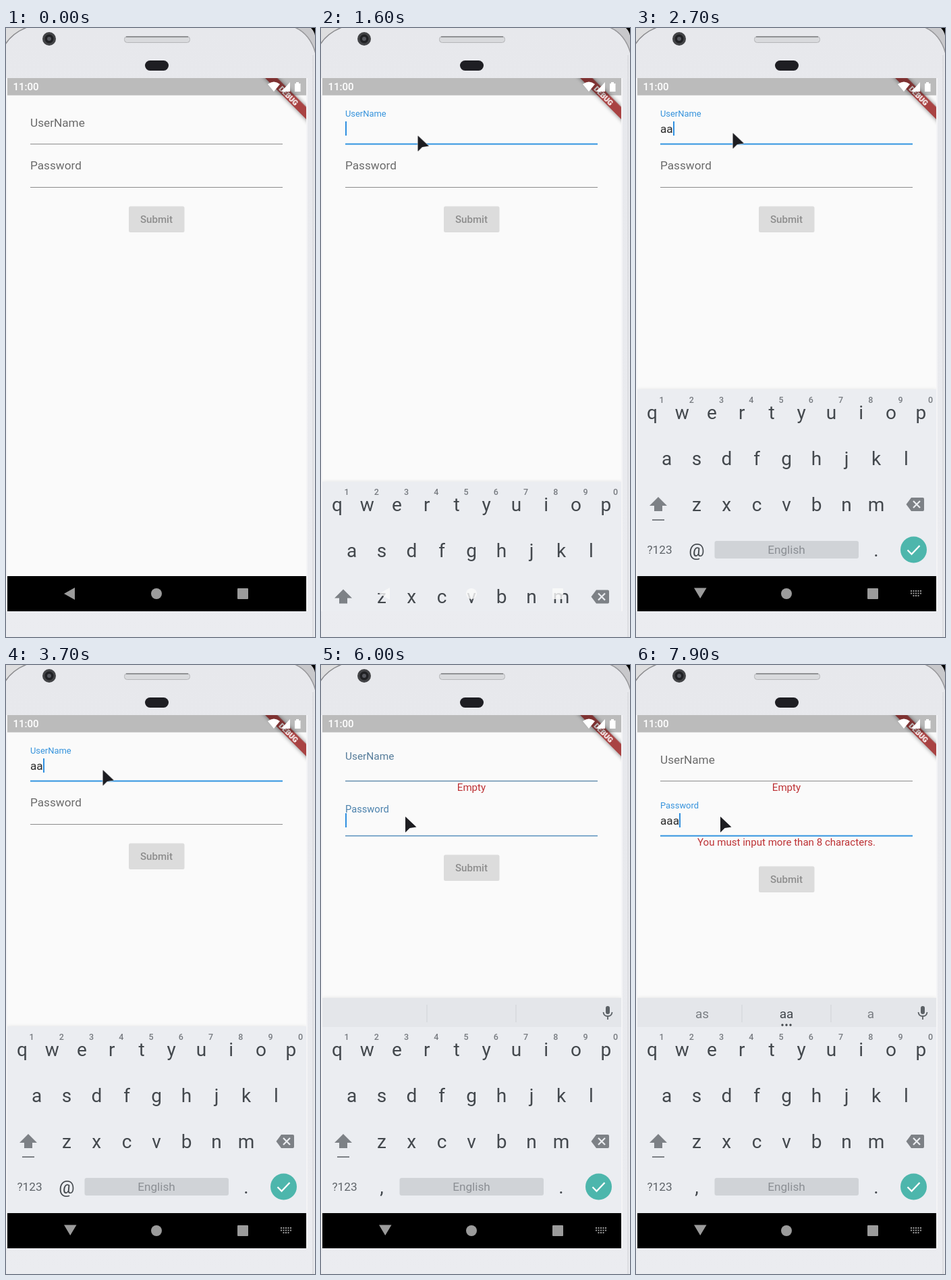
Animation of 458 by 900 pixels, one loop 8 s. Source, as an HTML page:

```html
<!DOCTYPE html>
<html lang="en">
<head>
<meta charset="utf-8">
<title>Login form validation</title>
<style>
  html, body { margin: 0; width: 100%; height: 100%; overflow: hidden; background: #e9ebef; }
  #stage { position: absolute; left: 0; top: 0; width: 458px; height: 900px; overflow: hidden; font-family: Roboto, sans-serif; }
  svg { position: absolute; left: 0; top: 0; }
  .mid { text-anchor: middle; }

  /* Every animation shares one 8 s loop: 1.25% is 100 ms. */
  .smooth { animation: 8s cubic-bezier(.4, 0, .2, 1) infinite both; }
  .step { animation: 8s step-end infinite both; }
  .label { font-size: 17.2px; }

  #userLabel { animation-name: userLabel; }
  @keyframes userLabel {
    0%, 17.625% { transform: translate(36px, 145.5px); fill: #6b6b6b; }
    20.125%, 74.05% { transform: translate(36px, 131.4px) scale(.75); fill: #3693dc; }
    76.55%, 100% { transform: translate(36px, 145.5px); fill: #6b6b6b; }
  }
  #userLine { animation-name: userLine; }
  @keyframes userLine {
    0%, 17.625% { stroke: #8c8c8c; stroke-width: 1px; }
    20.125%, 74.05% { stroke: #3193e0; stroke-width: 2.2px; }
    76.55%, 100% { stroke: #8c8c8c; stroke-width: 1px; }
  }
  #passLabel { animation-name: passLabel; }
  @keyframes passLabel {
    0%, 74.05% { transform: translate(36px, 209px); fill: #6b6b6b; }
    76.55%, 100% { transform: translate(36px, 195.3px) scale(.75); fill: #3693dc; }
  }
  #passLine { animation-name: passLine; }
  @keyframes passLine {
    0%, 74.05% { stroke: #8c8c8c; stroke-width: 1px; }
    76.55%, 100% { stroke: #3193e0; stroke-width: 2.2px; }
  }

  #passField { animation-name: passShift; }
  @keyframes passShift {
    0% { transform: none; }
    49.9%, 100% { transform: translateY(17px); }
  }
  #submit { animation-name: submitShift; }
  @keyframes submitShift {
    0% { transform: none; }
    49.9% { transform: translateY(17px); }
    84.9%, 100% { transform: translateY(34px); }
  }

  .error { font-size: 15.08px; fill: #bd3134; }
  #userError { animation-name: fromEmpty; }
  @keyframes fromEmpty { 0% { opacity: 0; } 49.9%, 100% { opacity: 1; } }
  #passError { animation-name: fromShort; }
  @keyframes fromShort { 0% { opacity: 0; } 84.9%, 100% { opacity: 1; } }

  .typed {
    --a: 9.36px;
    position: absolute; left: 36px; height: 21px; line-height: 22px; overflow: hidden;
    font-size: 17.2px; color: #2b2b2b; white-space: nowrap; border-right: 2px solid #2f8fe0;
  }
  #userText { top: 138px; animation-name: userType, userCaret; }
  @keyframes userType {
    0% { width: 0; }
    29.9% { width: var(--a); }
    32.4% { width: calc(2 * var(--a)); }
    34.9% { width: calc(3 * var(--a)); }
    37.4% { width: calc(4 * var(--a)); }
    41.15% { width: calc(3 * var(--a)); }
    46.15% { width: calc(2 * var(--a)); }
    47.4% { width: var(--a); }
    49.9%, 100% { width: 0; }
  }
  @keyframes userCaret {
    0%, 23.9%, 52.4%, 64.9%, 74.05%, 100% { border-color: transparent; }
    17.625%, 29.9%, 58.65%, 71.15% { border-color: #2f8fe0; }
  }
  #passText { top: 219px; animation-name: passType, passCaret; }
  @keyframes passType {
    0% { width: 0; }
    84.9% { width: var(--a); }
    88.65% { width: calc(2 * var(--a)); }
    93.1%, 100% { width: calc(3 * var(--a)); }
  }
  @keyframes passCaret {
    0%, 80.3% { border-color: transparent; }
    74.05%, 84.9%, 100% { border-color: #2f8fe0; }
  }

  #keyboard { animation: slide 8s cubic-bezier(.333, .667, .667, 1) infinite both; }
  @keyframes slide {
    0%, 18.75% { transform: translateY(334px); }
    22.25%, 100% { transform: none; }
  }
  .forPass { animation-name: forPass; }
  @keyframes forPass { 0% { opacity: 0; } 74.3%, 100% { opacity: 1; } }
  .forUser { animation-name: forUser; }
  @keyframes forUser { 0% { opacity: 1; } 74.3%, 100% { opacity: 0; } }
  #hints { animation-name: hints; }
  @keyframes hints { 0% { opacity: 0; } 86.15%, 100% { opacity: 1; } }

  #navBack { animation-name: navBack; }
  @keyframes navBack { 0%, 21.15%, 100% { opacity: 1; } 18.9% { opacity: 0; } }
  #navIcons { animation-name: navIcons; }
  @keyframes navIcons { 0%, 21.15%, 100% { fill: #9b9b9b; } 18.9% { fill: #fafafacc; } }
  #back { animation-name: backOut; }
  @keyframes backOut { 0% { opacity: 1; } 21.15%, 100% { opacity: 0; } }
  .hide { animation-name: hideIn; }
  @keyframes hideIn { 0% { opacity: 0; } 21.15%, 100% { opacity: 1; } }

  #pointer { animation: move 8s linear infinite both; }
  @keyframes move {
    0%, 2.5% { transform: translate(475px, 425px); }
    6.25% { transform: translate(370px, 335px); }
    8.75% { transform: translate(258px, 252px); }
    11.25% { transform: translate(174px, 184px); }
    12.5%, 20% { transform: translate(143.5px, 159px); }
    22.5%, 56.25% { transform: translate(143.5px, 155px); }
    57.5% { transform: translate(186px, 195px); }
    58.75% { transform: translate(221px, 238px); }
    60% { transform: translate(196px, 243px); }
    62.5%, 63.75% { transform: translate(136px, 242px); }
    65% { transform: translate(129.5px, 217px); }
    67.5%, 68.75% { transform: translate(128px, 221px); }
    72.5%, 100% { transform: translate(125px, 224px); }
  }
</style>
</head>
<body>
<div id="stage">
  <svg width="458" height="900" viewBox="0 0 458 900">
    <defs>
      <clipPath id="screen"><path d="M2 74H445V862H2Z"/></clipPath>
      <linearGradient id="body" x2="0" y2="1">
        <stop offset="0" stop-color="#e7e8ec"/>
        <stop offset="1" stop-color="#ebecf0"/>
      </linearGradient>
      <filter id="blur" x="-30%" y="-100%" width="160%" height="300%"><feGaussianBlur stdDeviation="3"/></filter>
    </defs>

    <!-- Phone body -->
    <path fill="url(#body)" d="M0 0H458V900H0Z"/>
    <path fill="#f4f4f6" d="M0 74H2V862H0ZM445 74H447V862H445Z"/>
    <path fill="none" stroke="#dcdde1" stroke-width="2" d="M455 40V900"/>
    <path fill="#dededf" stroke="#8d8d90" stroke-width="1.5" d="M-2 26Q8 8 31-1H-2Z"/>
    <path fill="#c8c8cb" stroke="#98989b" stroke-width="1.5" d="M428-1Q451 9 459 38V-1Z"/>
    <path d="M452 0Q457 5 458 11V0Z"/>
    <circle cx="64" cy="16" r="10" fill="#424346"/>
    <circle cx="64" cy="16" r="6.5" fill="#202124"/>
    <circle cx="64" cy="16" r="3" fill="#55575e"/>
    <rect x="175.5" y="12.5" width="97" height="9" rx="4" fill="#d9dadd" stroke="#b4b5b8"/>
    <path stroke="#7f8083" stroke-width="1.6" d="M178 13H270"/>
    <rect x="206" y="48" width="35" height="15" rx="7.5" fill="#1e1e23"/>

    <g clip-path="url(#screen)">
      <path fill="#fafafa" d="M2 74H445V862H2Z"/>

      <!-- Form -->
      <text id="userLabel" class="label smooth">UserName</text>
      <path id="userLine" class="smooth" d="M36 171.5H410"/>
      <text id="userError" class="error mid step" x="223" y="186">Empty</text>
      <g id="passField" class="step">
        <text id="passLabel" class="label smooth">Password</text>
        <path id="passLine" class="smooth" d="M36 235.5H410"/>
      </g>
      <text id="passError" class="error mid step" x="223" y="267">You must input more than 8 characters.</text>
      <g id="submit" class="step">
        <rect x="182" y="263.5" width="82.5" height="38.5" rx="2.5" fill="#dcdcdc"/>
        <text class="mid" x="223" y="288.3" font-size="15.08" font-weight="500" fill="#8d8d8d">Submit</text>
      </g>

      <!-- Banner and status bar -->
      <g transform="translate(445 74) rotate(45)">
        <path filter="url(#blur)" opacity=".5" d="M-60 30.2H60V43.1H-60Z"/>
        <path fill="#a94343" d="M-70 30.2H70V43.1H-70Z"/>
        <text class="mid" y="40.6" font-size="11" font-weight="900" fill="#fff">DEBUG</text>
      </g>
      <path opacity=".25" d="M2 74H445V99.5H2Z"/>
      <g fill="#fff">
        <text x="10.5" y="92.3" font-size="15" font-weight="500">11:00</text>
        <path d="M397 94L388 83Q397 76 406 83Z"/>
        <path d="M408 94H421V80Z"/>
        <path d="M428 82H430V80H434V82H436.500V94H428Z"/>
      </g>

      <!-- Keyboard -->
      <g id="keyboard">
        <path filter="url(#blur)" opacity=".13" d="M2 535H445V560H2Z"/>
        <path fill="#ebedf1" d="M2 534H445V880H2Z"/>
        <g class="forPass step">
          <path filter="url(#blur)" opacity=".13" d="M2 493H445V510H2Z"/>
          <path fill="#e4e6ea" d="M2 492H445V535H2Z"/>
          <path stroke="#d0d3d7" d="M157 502V528M289 502V528"/>
          <rect x="422" y="504" width="6" height="12" rx="3" fill="#5c6166"/>
          <path fill="none" stroke="#5c6166" stroke-width="1.8" d="M418.500 513Q419 519 425 519Q431 519 431.500 513M425 519V524"/>
          <g id="hints" class="mid step" font-size="19" fill="#7b7f84">
            <text x="98" y="522">as</text>
            <text x="223" y="522" fill="#42474c">aa</text>
            <text x="348" y="522">a</text>
            <path stroke="#42474c" stroke-width="3.4" stroke-linecap="round" d="M217 532h0M223 532h0M229 532h0"/>
          </g>
        </g>
        <g class="mid" font-size="28" fill="#43484d">
          <text y="578" x="24 68.2 112.500 156.700 201 245.200 289.500 333.700 378 422.300">qwertyuiop</text>
          <text y="645.500" x="45.500 90 134.300 179 223 267.500 312 356 400.500">asdfghjkl</text>
          <text y="713.500" x="90 134.300 179 223 267.500 312 356">zxcvbnm</text>
          <text class="forUser step" x="90" y="781" font-size="26">@</text>
          <text class="forPass step" x="90" y="781">,</text>
          <text x="356" y="781">.</text>
        </g>
        <text class="mid" y="554" font-size="12.500" font-weight="500" fill="#777b80" x="38 82.300 126.500 170.700 215 259.300 303.500 347.800 392 436.500">1234567890</text>
        <path fill="#7d8186" d="M33 693L46 706H39V714H27V706H20Z"/>
        <path stroke="#7d8186" stroke-width="2" d="M24 727H42"/>
        <path fill="#7d8186" d="M400.500 704L408 694H425Q427 694 427 696V712Q427 714 425 714H408Z"/>
        <path stroke="#ebedf1" stroke-width="2.2" d="M411 699L421 709M421 699L411 709"/>
        <rect x="116.500" y="758" width="213.500" height="26" rx="3" fill="#d0d3d7"/>
        <g class="mid" font-size="17.200">
          <text x="35" y="777" fill="#5f6469">?123</text>
          <text x="223" y="777" fill="#8b8f94">English</text>
        </g>
        <circle cx="411.500" cy="771" r="19.500" fill="#4db6ac"/>
        <path fill="none" stroke="#fff" stroke-width="2.300" d="M402.500 771.500L408.500 777.500L420.500 765"/>
      </g>

      <!-- Navigation bar -->
      <path id="navBack" class="step" d="M2 810H445V862H2Z"/>
      <g id="navIcons" class="step">
        <path id="back" class="step" d="M86 836L102 827V845Z"/>
        <path class="hide step" d="M86 827.500H104.500L95.200 843Z"/>
        <circle cx="223" cy="836" r="8"/>
        <rect x="343" y="828" width="16" height="16" rx="1"/>
        <path class="hide step" fill="none" stroke="#9b9b9b" stroke-width="2" stroke-dasharray="2 1.500" d="M407 832H424M407 835.500H424M410.500 839H421"/>
      </g>
    </g>
  </svg>

  <div id="userText" class="typed step">aaaa</div>
  <div id="passText" class="typed step">aaa</div>

  <svg width="458" height="900" viewBox="0 0 458 900">
    <path id="pointer" fill="#1d1d21" stroke="#fff" stroke-width="1" paint-order="stroke" d="M0 0V23.500L6.500 17L16.500 15.500Z"/>
  </svg>
</div>
</body>
</html>
```
